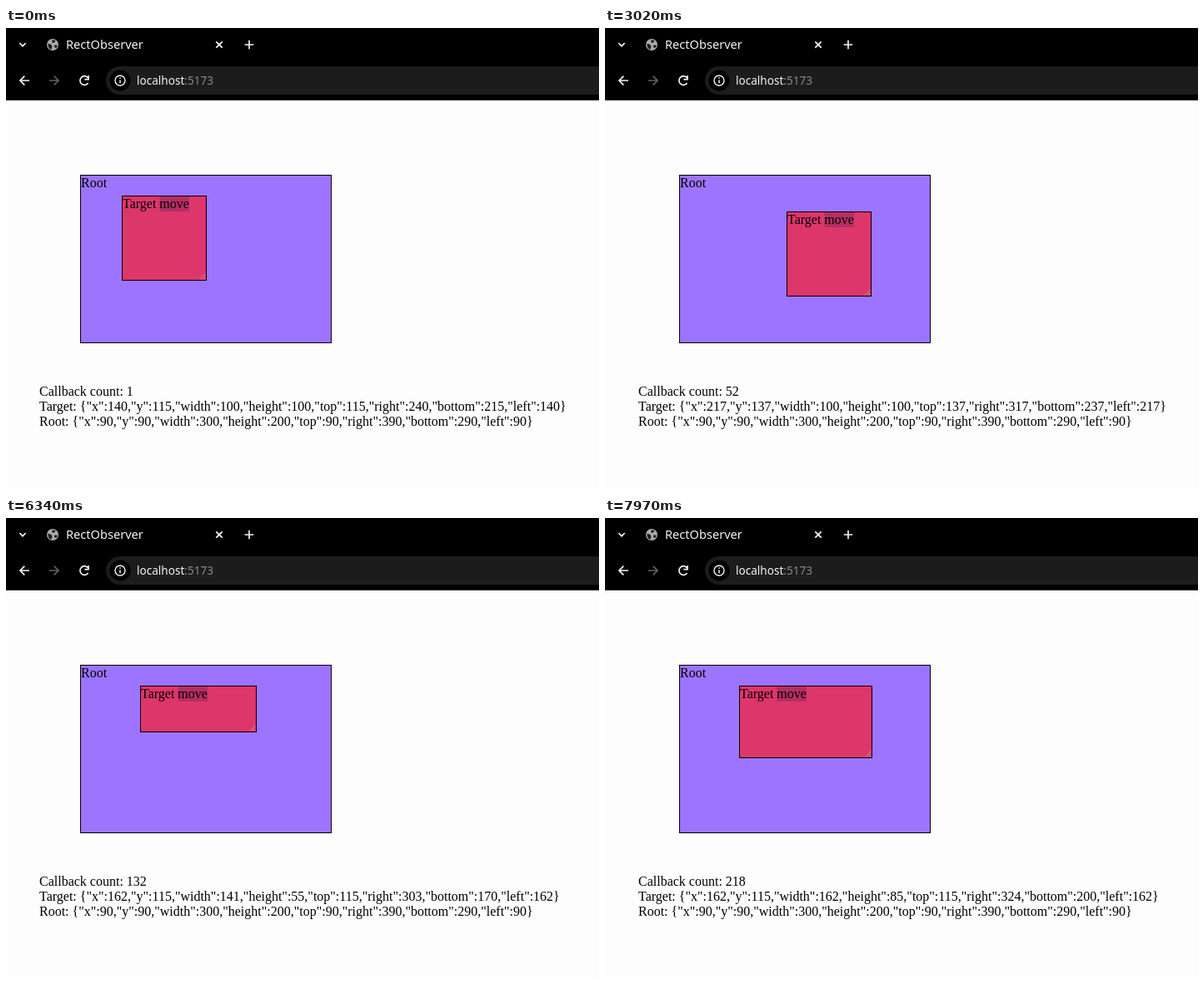
An HTML page that plays this animation: 712 px wide and 554 px high, repeating every 8 s.

```html
<!DOCTYPE html>
<html lang="en">
<head>
<meta charset="utf-8">
<title>RectObserver</title>
<style>
  html, body { margin: 0; width: 100%; height: 100%; overflow: hidden; background: #fdfdfd; }
  svg { display: block; }
  .page { font: 16px "Liberation Serif", "Times New Roman", serif; fill: #000; white-space: pre; }
  .bar { font-family: "Noto Sans", "Open Sans", sans-serif; fill: #f4f4f4; }
  .icon { fill: none; stroke: #f4f4f4; stroke-width: 1.7; }
</style>
</head>
<body>
<svg width="712" height="554" viewBox="0 0 712 554">
  <!-- browser bar -->
  <rect width="712" height="87"/>
  <rect y="86" width="712" height="1" fill="#4a4644"/>
  <rect x="120" y="46" width="640" height="34" rx="17" fill="#1c1c1d"/>
  <circle cx="137" cy="63" r="12.5"/>
  <g class="icon">
    <path d="M16.3 18 20 21.7 23.7 18"/>
    <path d="M252.3 16.3l7.4 7.4m0-7.4-7.4 7.4M292 14.7v10.6M286.7 20h10.6"/>
    <path d="M28 63H17.3M22.3 57.7 17 63l5.3 5.3"/>
    <path d="M52 63h10.7M57.7 57.7 63 63l-5.3 5.3" stroke="#606060"/>
    <path d="M98.6 66A5.3 5.3 0 1 1 98 59.3M99 57v4.6h-4.6"/>
    <circle cx="137" cy="63" r="6" stroke-width="1.4"/>
    <path d="M137 62.2v4M137 59.3v1.5" stroke-width="1.5"/>
  </g>
  <circle cx="56" cy="20" r="7" fill="#a9abae"/>
  <path d="M50.5 18.5l4 1.5 1 2.2-1 3.6q-4-1-4-5.8zM55 14.5l4.5.2-1 2.3-2.5 1.3zM58 20.5l4 .3-1.6 3.2-2.4-1z" fill="#1c1c1d"/>
  <g class="bar">
    <text x="72" y="25" font-size="14.6">RectObserver</text>
    <text x="157" y="68" font-size="13.57">localhost<tspan fill="#8a8a8a">:5173</tspan></text>
  </g>

  <!-- page -->
  <g class="page">
    <rect x="89.5" y="176.5" width="301" height="201" fill="#9d74ff" stroke="#000"/>
    <text x="90" y="191">Root</text>
    <g id="target">
      <rect id="box" x="-.5" y="-.5" fill="#dd366b" stroke="#000"/>
      <rect x="44.5" width="35.5" height="18" fill="#b52e63"/>
      <text y="14">Target move</text>
      <path id="grip" d="M-7-.5-.5-7M-3-.5-.5-3" stroke="#c79aa6"/>
    </g>
    <text x="40" y="441" id="count"></text>
    <text x="40" y="459" id="targetInfo"></text>
    <text x="40" y="477" id="rootInfo"></text>
  </g>
</svg>
<script>
const LOOP = 8000, LAG = 16, PAGE_TOP = 87;
const $ = id => document.getElementById(id);

// Pointer poses: time, callbacks so far, [position], [velocity per ms].
const pose = (t, calls, pos, vel = [0, 0]) => ({ t, calls, pos, vel });
const move = [
  pose(2150, 1, [140, 115]),
  pose(3020, 52, [219, 134], [.125, -.19]),
  pose(3510, 79, [162, 115])
];
const size = [
  pose(5200, 79, [100, 100]),
  pose(5830, 105, [175, 153], [.125, -.38]),
  pose(6914, 163, [124, 55], [.25, 0]),
  pose(7964, 218, [158, 85], [-.25, 0])
];

// The pointer swings from pose to pose on a cubic that keeps its momentum.
function at(poses, t) {
  let i = 0;
  while (i < poses.length - 2 && t >= poses[i + 1].t) i++;
  const a = poses[i], b = poses[i + 1], span = b.t - a.t;
  const u = Math.min(1, Math.max(0, (t - a.t) / span));
  const ease = u * u * (3 - 2 * u);
  const pos = a.pos.map((p, k) => Math.round(p + (b.pos[k] - p) * ease
    + span * u * (1 - u) * ((1 - u) * a.vel[k] - u * b.vel[k])));
  return { pos, calls: Math.round(a.calls + (b.calls - a.calls) * u) };
}

const describe = (x, y, width, height) =>
  JSON.stringify({ x, y, width, height, top: y, right: x + width, bottom: y + height, left: x });

// The picture refreshes in discrete steps.
function stepTime(t) {
  const [start, step] = t < 5220 ? [2170, 34] : [5220, 33.88];
  return t < start ? t : start + Math.floor((t - start) / step) * step;
}

function draw() {
  const t = stepTime(performance.now() % LOOP);
  const moved = at(move, t), sized = at(size, t);
  const [x, y] = moved.pos, [w, h] = sized.pos;
  $('target').setAttribute('transform', `translate(${x} ${y + PAGE_TOP})`);
  $('box').setAttribute('width', w + 1);
  $('box').setAttribute('height', h + 1);
  $('grip').setAttribute('transform', `translate(${w} ${h})`);
  $('count').textContent = `Callback count: ${Math.max(moved.calls, t < size[0].t ? 0 : sized.calls)}`;
  $('targetInfo').textContent = 'Target: ' + describe(...at(move, t - LAG).pos, ...at(size, t - LAG).pos);
  requestAnimationFrame(draw);
}

$('rootInfo').textContent = 'Root: ' + describe(90, 90, 300, 200);
draw();
</script>
</body>
</html>
```
